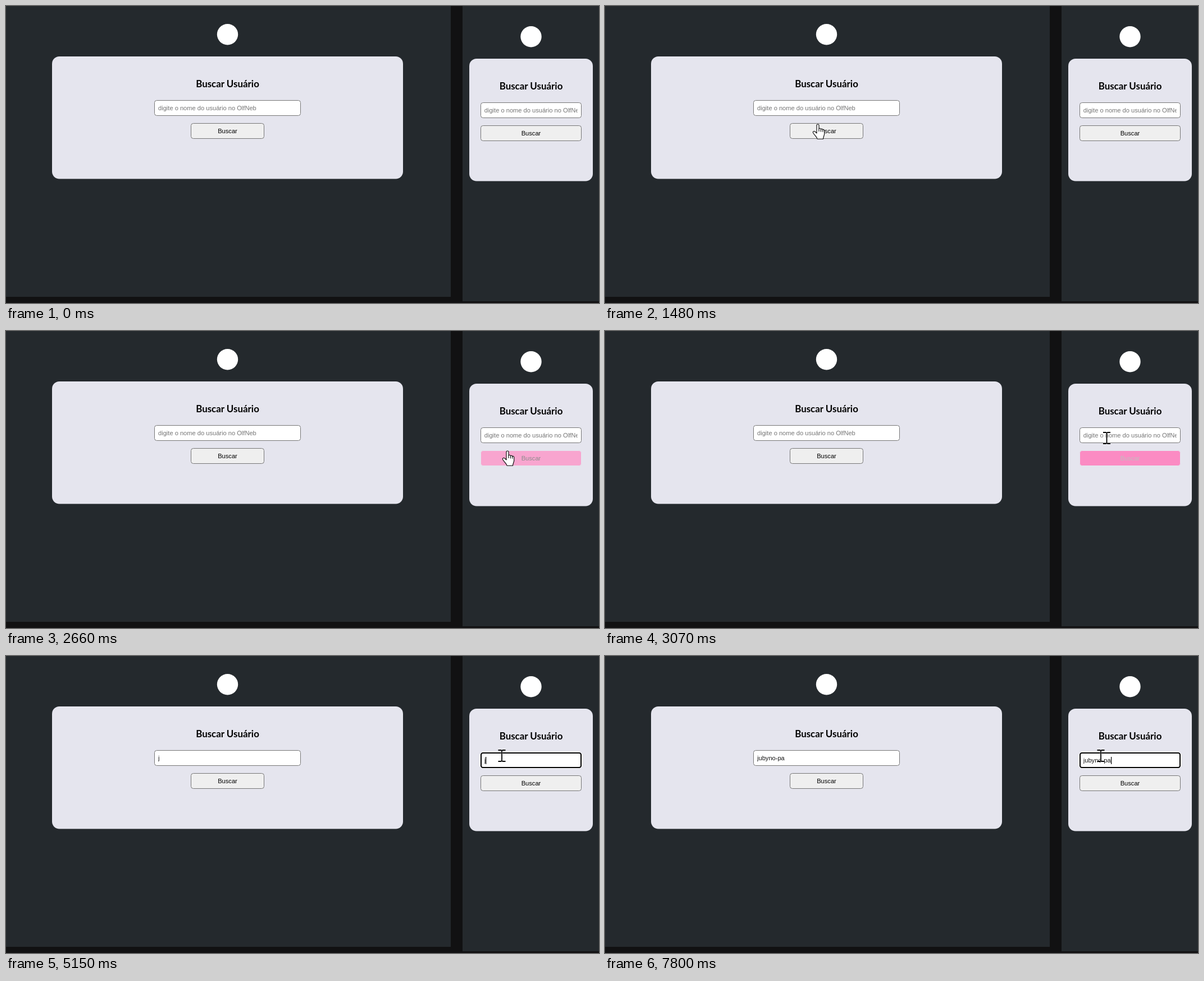
Write an HTML page that moves like this. It is 1056x530 px and loops after 8 s.

```html
<!DOCTYPE html>
<html lang="pt-BR">
<head>
<meta charset="utf-8">
<title>Buscar Usuário</title>
<style>
  html, body { margin: 0; width: 100%; height: 100%; overflow: hidden; background: #111112; }
  svg { display: block; width: 100%; height: 100%; }
  text { font: 11.11px "Liberation Sans", Arial, sans-serif; white-space: pre; }
  .title { font: 700 16.9px Lato, sans-serif; text-anchor: middle; }
  .label { text-anchor: middle; }
  .field { fill: #fff; stroke: #767676; }
  .hint { fill: #757575; }
  .typed { fill: #111; }
  #cursor > g { display: none; }
</style>
</head>
<body>
<svg viewBox="0 0 1056 530">
  <rect width="792" height="519" fill="#24292d"/>
  <rect x="813" width="243" height="527" fill="#24292d"/>
  <g id="wide"></g>
  <g id="narrow"></g>
  <g id="focus" fill="none">
    <rect x="844.5" y="171.5" width="181" height="29" rx="5" stroke="#fff"/>
    <rect x="846" y="173" width="178" height="26" rx="3.5" stroke="#000" stroke-width="2"/>
  </g>
  <rect id="caret" y="180" width="1.2" height="13"/>
  <g id="cursor" stroke-linejoin="round">
    <g id="arrow">
      <path d="M.5 .5V19.8L4.9 15.8 8 23.2 11.3 21.8 8.3 14.6H14.8Z" fill="#fff" stroke="#000"/>
    </g>
    <g id="hand" fill="#fff" stroke="#000" stroke-width="1.1">
      <path d="M-2 14V2A2 2 0 0 1 2 2V8.5C2 6.8 5.3 6.8 5.5 9 6 7.7 8.7 8 8.8 10 9.5 8.9 11.7 9.4 11.7 11.5V17C11.7 20 9.8 21.5 9.5 26.3H-1C-1.5 22.5-6 19.5-8.5 15.3-9.5 13-6.5 11.6-4.8 13.2L-2 16Z"/>
      <path d="M2 8.5V13M5.5 9V13.4M8.8 10V13.8" fill="none"/>
    </g>
    <g id="beam" fill="none">
      <path d="M-6.5-10H-1.5L0-9 1.5-10H6.5M-6.5 10H-1.5L0 9 1.5 10H6.5M0-9V9" stroke="#fff" stroke-width="3" opacity=".6"/>
      <path d="M-6.5-10H-1.5L0-9 1.5-10H6.5M-6.5 10H-1.5L0 9 1.5 10H6.5M0-9V9" stroke="#000" stroke-width="1.8"/>
    </g>
  </g>
</svg>
<script>
const LOOP = 8000, TICK = 70;
const NAME = 'jubyno-pa', HINT = 'digite o nome do usuário no OlfNeb';
const el = id => document.getElementById(id);

function buildPanel(id, p) {
  const cx = p.card + p.cardW / 2;
  const root = el(id);
  root.setAttribute('transform', `translate(0 ${p.dy})`);
  root.innerHTML = `
    <clipPath id="${id}Clip"><rect x="${p.text}" y="169" width="${p.fieldW - 13}" height="26"/></clipPath>
    <circle cx="${cx}" cy="50.7" r="18.7" fill="#fff"/>
    <rect x="${p.card}" y="90" width="${p.cardW}" height="218.5" rx="13" fill="#e5e5ee"/>
    <text class="title" x="${cx}" y="144.5">Buscar Usuário</text>
    <rect class="field" x="${p.field}" y="168.5" width="${p.fieldW}" height="27" rx="4"/>
    <g clip-path="url(#${id}Clip)">
      <text class="hint" x="${p.text}" y="186">${HINT}</text>
      <text class="typed" x="${p.text}" y="186"></text>
    </g>
    <rect class="button" x="${p.button}" y="209.5" width="${p.buttonW}" height="27" rx="4"/>
    <text class="label" x="${cx}" y="227">Buscar</text>`;
  const pick = name => root.querySelector('.' + name);
  return { hint: pick('hint'), typed: pick('typed'), button: pick('button'), label: pick('label') };
}

const wide = buildPanel('wide', { dy: 0, card: 82, cardW: 625, field: 264.5, fieldW: 260, text: 271, button: 329.5, buttonW: 130 });
const narrow = buildPanel('narrow', { dy: 4, card: 825, cardW: 220, field: 845.5, fieldW: 179, text: 851.8, button: 845.5, buttonW: 179 });

// Turns waypoints [time, x, y, kind] into one step per tick.
function drive(points) {
  const steps = [];
  points.forEach(([t, x, y, kind], i) => {
    const [t2, x2, y2] = points[i + 1] || [t + TICK, x, y];
    for (let s = t; s < t2; s += TICK) {
      const k = (s - t) / (t2 - t);
      steps.push([s, x + (x2 - x) * k, y + (y2 - y) * k, kind]);
    }
  });
  return steps;
}

// Swaps the text cursor for an arrow for a moment.
const flicker = (from, to) => [[from, 881, 177, 'arrow'], [to, 883, 178, 'beam']];

const cursorSteps = [
  [0, 0, 0, 'none'],
  ...drive([
    [430, 712, 404, 'arrow'], [850, 400, 228, 'arrow'], [990, 290, 197, 'arrow'],
    [1060, 256, 204, 'arrow'], [1130, 248, 222, 'arrow'], [1200, 277, 230, 'arrow'],
    [1270, 300, 222, 'arrow'], [1340, 326, 203, 'arrow'], [1410, 352, 191, 'beam'],
    [1480, 379, 211, 'hand']
  ]),
  ...drive([
    [1890, 400, 216, 'hand'], [1960, 470, 238, 'arrow'], [2030, 570, 254, 'arrow'],
    [2100, 655, 260, 'arrow'], [2170, 722, 257, 'arrow'], [2520, 878, 246, 'arrow'],
    [2590, 891, 224, 'hand'], [2660, 893, 214, 'hand']
  ]),
  [3070, 893.5, 191, 'beam'], [3140, 886, 181, 'beam'], [3230, 883, 178, 'beam'],
  ...flicker(4160, 4230), ...flicker(5410, 5540), ...flicker(6400, 6530),
  ...flicker(7130, 7330), ...flicker(7600, 7800)
];
const wideHover = [[0, 0], [1550, .55], [1620, .9], [1690, 1], [1960, .5], [2030, .1], [2100, 0]];
const narrowHover = [[0, 0], [2660, .55], [2730, .9], [2800, 1], [3070, .75], [3140, .2], [3230, 0]];
const caretSteps = [[0, 0], [3630, 1], [4160, 0], [4690, 1], [5940, 0], [6400, 1]];
const keyTimes = [5150, 5280, 5410, 6400, 6530, 6800, 7200, 7530, 7730];

const stepAt = (steps, t) => steps.findLast(s => s[0] <= t);
const show = (node, on) => { node.style.display = on ? 'inline' : 'none'; };
const mix = (a, b, k) => `rgb(${a.map((v, i) => Math.round(v + (b[i] - v) * k))})`;

function paintButton({ button, label }, k) {
  button.setAttribute('fill', mix([239, 239, 239], [255, 105, 180], k));
  button.setAttribute('stroke', k ? '#e5e5ee' : '#767676');
  label.setAttribute('fill', mix([0, 0, 0], [255, 255, 255], k));
}

function draw(t) {
  const [, x, y, kind] = stepAt(cursorSteps, t);
  el('cursor').setAttribute('transform', `translate(${x} ${y})`);
  for (const id of ['arrow', 'hand', 'beam']) show(el(id), id === kind);

  paintButton(wide, stepAt(wideHover, t)[1]);
  paintButton(narrow, stepAt(narrowHover, t)[1]);

  const value = NAME.slice(0, keyTimes.filter(k => k <= t).length);
  for (const { hint, typed } of [wide, narrow]) {
    show(hint, !value);
    typed.textContent = value;
  }
  show(el('focus'), t >= 3630);
  show(el('caret'), stepAt(caretSteps, t)[1]);
  const end = value ? narrow.typed.getComputedTextLength() : 0;
  el('caret').setAttribute('x', Math.round(851.8 + end));
}

const start = performance.now();
function frame() {
  draw((performance.now() - start) % LOOP);
  requestAnimationFrame(frame);
}
frame();
</script>
</body>
</html>
```
